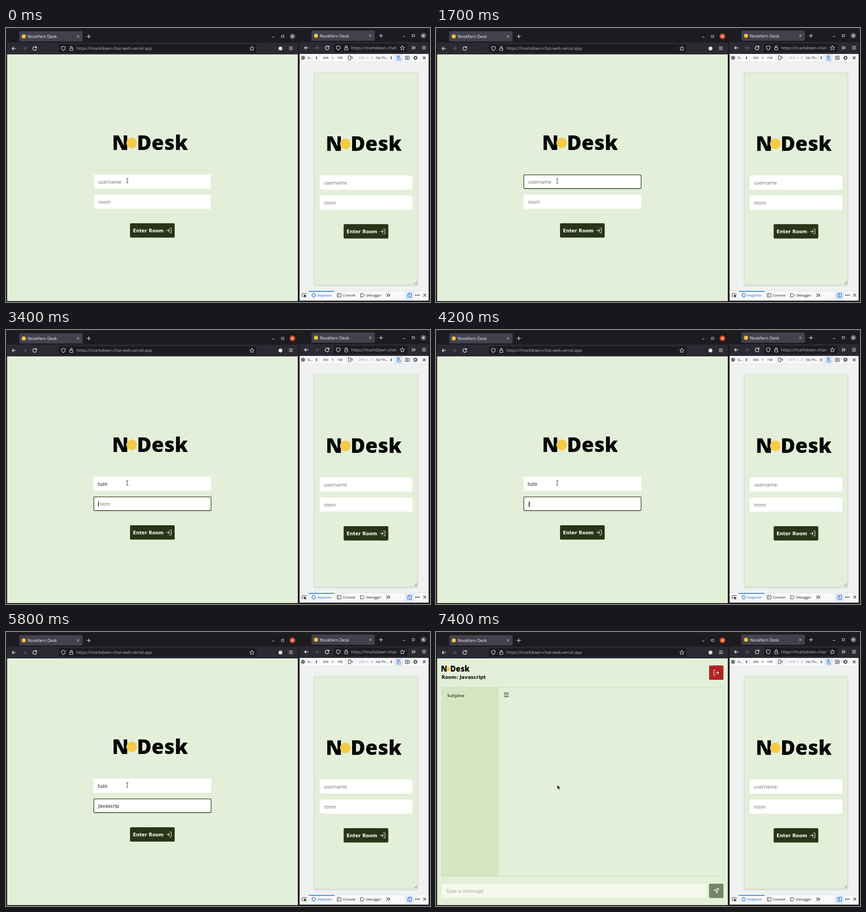
Recreate the animation shown at these times as an HTML page. Size 930x602 px, loop 8000 ms.

```html
<!DOCTYPE html>
<html lang="en">
<head>
<meta charset="utf-8">
<title>Nookfern Desk</title>
<style>
  html, body { margin: 0; width: 100%; height: 100%; overflow: hidden; background: #201f1d; }
  svg { display: block; width: 930px; height: 602px; }
  text { white-space: pre; }
  .ui { font: 9.2px "Open Sans", "Noto Sans", sans-serif; }
  .tool { font: 7.3px "Open Sans", "Noto Sans", sans-serif; fill: #18181a; }
  .web { font: 10.2px "DejaVu Sans", sans-serif; }
  .bold { font-weight: bold; }
  .hint { fill: #757871; }
  .logo { font: 800 44px "Open Sans", "Noto Sans", sans-serif; fill: #050402; }
  .line { fill: none; stroke-linecap: round; stroke-linejoin: round; }
  .field { fill: #fffffd; }
</style>
</head>
<body>
<svg viewBox="0 0 930 602">
  <defs>
    <g id="tab">
      <rect x="29" y="7" width="139" height="22.5" rx="2.5" fill="#42414d"/>
      <circle cx="39" cy="18.5" r="4.5" fill="#f3c43c"/>
      <text class="ui" x="47.5" y="22" fill="#fbfbfe">Nookfern Desk</text>
      <path class="line" d="M155.7 16.2l4.6 4.6m0-4.6l-4.6 4.6" stroke="#e4e4e8" stroke-width=".9"/>
      <path class="line" d="M177.5 18.5h8m-4-4v8" stroke="#fbfbfe" stroke-width="1.1"/>
    </g>
    <g id="controls" class="line" stroke="#e6e6e8">
      <path d="M584 20h4" stroke-width="1.1"/>
      <rect x="604.7" y="16" width="4.6" height="4.6"/>
    </g>
    <path id="cross" class="line" d="M-2.2-2.2l4.4 4.4m0-4.4l-4.4 4.4" stroke-width="1.1"/>
    <g id="nav" class="line" stroke-width="1.2">
      <path d="M21.5 45h-8m3.4-3.4L13.5 45l3.4 3.4" stroke="#fbfbfe"/>
      <path d="M36.5 45h8m-3.4-3.4l3.4 3.4-3.4 3.4" stroke="#65646e"/>
      <path d="M66.3 42.5a4.1 4.1 0 1 0 .8 3M67 40.6v2.6h-2.6" stroke="#fbfbfe"/>
    </g>
    <g id="guard" class="line" stroke="#e6e6ea" stroke-width="1.1">
      <path d="M125.8 40.3l4.3 1.5c.1 3.7-1.3 6.3-4.3 8-3-1.7-4.4-4.3-4.3-8z"/>
      <rect x="139.8" y="44.5" width="6.8" height="5" rx="1"/>
      <path d="M141.2 44.4v-2a2 2 0 0 1 4 0v2"/>
    </g>
    <path id="star" class="line" d="M0-4.8l1.4 3.1 3.5.4-2.6 2.3.8 3.4L0 2.7l-3.1 1.7.8-3.4-2.6-2.3 3.5-.4z" stroke="#e6e6ea"/>
    <path id="menu" class="line" d="M-3.7-3h7.4M-3.7 0h7.4M-3.7 3h7.4" stroke-width="1.1"/>
    <path id="more" class="line" d="M-3.5-3l3 3-3 3m4-6l3 3-3 3" stroke-width="1.1"/>
    <path id="updown" d="M-1.8-.8L0-3 1.8-.8zM-1.8.8L0 3 1.8.8z"/>
    <g id="logo">
      <text class="logo" x="232.5" y="268">N</text>
      <circle cx="275.5" cy="252.5" r="11.5" fill="#f7c948"/>
      <text class="logo" x="287" y="268">Desk</text>
    </g>
    <g id="enter">
      <rect x="272" y="429" width="98" height="31.5" rx="2.5" fill="#283516"/>
      <text class="web bold" x="278.5" y="448.5" fill="#fbfdf8">Enter Room</text>
      <path class="line" transform="translate(349.9 437.7) scale(.61)" stroke="#f4f7ef" stroke-width="1.8"
        d="M15 3h4a2 2 0 0 1 2 2v14a2 2 0 0 1-2 2h-4M10 17l5-5-5-5m5 5H3"/>
    </g>
    <filter id="soft" x="-10%" y="-10%" width="120%" height="120%">
      <feDropShadow dx="0" dy="1" stdDeviation="1.5" flood-color="#000" flood-opacity=".2"/>
    </filter>
    <clipPath id="url"><rect x="720" y="34" width="138" height="20"/></clipPath>
  </defs>

  <!-- wide window -->
  <path d="M2.5 600V9a6 6 0 0 1 6-6H634a6 6 0 0 1 6 6v591z" fill="#1c1b22"/>
  <rect x="2.5" y="32" width="637.5" height="26" fill="#2b2a33"/>
  <rect x="116" y="35.5" width="433.5" height="18.8" rx="2.5" fill="#1c1b22"/>
  <rect x="2.5" y="58" width="637.5" height="542" fill="#e3efd8"/>
  <use href="#tab"/>
  <use href="#controls"/>
  <circle id="close" cx="628.3" cy="18.3" r="6.2"/>
  <use href="#cross" x="628.3" y="18.3" stroke="#fff"/>
  <use href="#nav"/>
  <use href="#guard"/>
  <text class="ui" x="154.5" y="48.3" fill="#b9b8c0">https://markdown-chat-web.vercel.app</text>
  <use href="#star" x="539.3" y="45"/>
  <circle cx="602" cy="45" r="4.3" fill="#e6e6ea"/>
  <use href="#menu" x="624.8" y="44.5" stroke="#fbfbfe"/>

  <g id="login">
    <use href="#logo"/>
    <g id="user"><rect class="field" y="322" height="31.4" rx="2.5"/><text class="web" y="341.7"></text></g>
    <g id="room"><rect class="field" y="366" height="31.4" rx="2.5"/><text class="web" y="385.7"></text></g>
    <rect id="caret" width="1" height="12" fill="#111"/>
    <use href="#enter"/>
    <path id="beam" class="line" d="M264 330.5q2 0 2 1.2 0-1.2 2-1.2M266 331.5v8M264 340.7q2 0 2-1.2 0 1.2 2 1.2" stroke="#4b4d48" stroke-width="1.1"/>
  </g>

  <g id="chat">
    <use href="#logo" transform="translate(-77.7 -15.3) scale(.38)"/>
    <text class="web bold" x="12" y="103.2" fill="#0d0f0a">Room: Javascript</text>
    <rect x="599" y="73.5" width="31.5" height="31.5" rx="2.5" fill="#b02425"/>
    <path class="line" transform="translate(607.4 82.2) scale(.61)" stroke="#fff" stroke-width="1.8"
      d="M9 21H5a2 2 0 0 1-2-2V5a2 2 0 0 1 2-2h4M16 17l5-5-5-5m5 5H9"/>
    <rect x="12" y="122" width="126" height="414.5" fill="#d4e6c2"/>
    <rect x="12.3" y="121.8" width="618" height="415" rx="2" fill="none" stroke="#c9d8b8" stroke-width=".9"/>
    <text class="web bold" x="25" y="143" fill="#555f4b" style="font-size:8.9px">katpine</text>
    <path class="line" d="M149.5 134.2h9.6m-9.6 3.8h9.6m-9.6 3.8h9.6" stroke="#151713" stroke-width="1.2"/>
    <rect x="12" y="553" width="581" height="31.5" rx="2.5" fill="#f5f9ec"/>
    <text class="web" x="22" y="572.6" fill="#a2a79c">Type a message</text>
    <rect x="599" y="553" width="31.5" height="31.5" rx="2.5" fill="#748466"/>
    <path class="line" d="M620 563.3l-10.5 4 4.7 2 2 4.7zl-5.8 6" stroke="#fff" stroke-width="1.1"/>
    <path d="M266 335.5v10.2l2.3-2.1 1.6 3.6 1.7-.8-1.6-3.4h3.1z" fill="#111" stroke="#f4f8ef" stroke-width=".7"/>
  </g>

  <!-- narrow window -->
  <path d="M644 599V9a6 6 0 0 1 6-6h271a6 6 0 0 1 6 6v590z" fill="#1c1b22"/>
  <rect x="644" y="31" width="283" height="26" fill="#2b2a33"/>
  <rect x="719.5" y="34.5" width="161" height="18.5" rx="2.5" fill="#1c1b22"/>
  <use href="#tab" x="641" y="-1.5"/>
  <use href="#controls" x="286.7" y="-1.5"/>
  <circle cx="915.5" cy="16.8" r="6.2" fill="#5b5956"/>
  <use href="#cross" x="915.5" y="16.8" stroke="#fff"/>
  <use href="#nav" x="641.3" y="-1.3"/>
  <use href="#guard" x="603" y="-1.3"/>
  <text class="ui" x="757" y="47" fill="#b9b8c0" clip-path="url(#url)">https://markdown-chat-web</text>
  <use href="#star" x="869.5" y="43.7"/>
  <use href="#more" x="894" y="43.5" stroke="#fbfbfe"/>
  <use href="#menu" x="916.7" y="43.2" stroke="#fbfbfe"/>

  <!-- device toolbar -->
  <rect x="644" y="57" width="283" height="542" fill="#eff2f1"/>
  <rect x="644" y="57" width="283" height="18" fill="#f6f7f8"/>
  <path d="M644 75h283" stroke="#dddfe1" stroke-width=".8"/>
  <path d="M686.5 58v15M747 58v15M766 58v15M808.5 58v15M850.5 58v15" stroke="#e1e2e5" stroke-width=".8"/>
  <path d="M690 58.5h22v14h-22zM721 58.5h23v14h-23z" fill="#fff"/>
  <circle cx="651.5" cy="65.5" r="4.6" fill="#77787a"/>
  <g class="tool">
    <text x="661.5" y="68.2">G...</text>
    <text x="694.8" y="68.2">360</text>
    <text x="714.3" y="68.2">×</text>
    <text x="726" y="68.2">740</text>
    <text x="773" y="68.2" fill="#a5a6a9">DPR: 4</text>
    <text x="811.8" y="68.2">No Th...</text>
  </g>
  <use href="#updown" x="681" y="65.5"/>
  <use href="#updown" x="802.5" y="65.5" fill="#a5a6a9"/>
  <use href="#updown" x="845" y="65.5"/>
  <rect x="852.5" y="57.5" width="18" height="16.5" fill="#dde7f4"/>
  <g class="line" stroke="#222326">
    <rect x="751" y="61.2" width="5.5" height="8.6" rx="1"/>
    <path d="M758 63.3h1.5v3.5m-1.2-1.2l1.2 1.2 1.2-1.2" stroke-width=".8"/>
    <rect x="875.7" y="62" width="9" height="7.3" rx="1.2"/>
    <circle cx="880.2" cy="65.7" r="1.7"/>
    <circle cx="898" cy="65.5" r="2.8" stroke-width="1.4"/>
    <circle cx="898" cy="65.5" r="4.1" stroke-width="1.6" stroke-dasharray="1 2.22" stroke-linecap="butt"/>
  </g>
  <path class="line" d="M859.5 68v-5a1 1 0 0 1 2 0v3l2.8.6c.8.2 1 .7.8 1.4l-.6 2.7h-4.3l-2.6-3.2q.6-.9 1.9.5M857.8 64a2.8 2.8 0 1 1 5.4 0" stroke="#1565d8" stroke-width=".9"/>
  <use href="#cross" transform="translate(917.3 65.5) scale(1.2)" stroke="#222326"/>

  <!-- device screen -->
  <rect x="676.3" y="97.7" width="226.7" height="467" fill="#e3efd8" filter="url(#soft)"/>
  <rect x="676.3" y="97.7" width="226.7" height="467" fill="none" stroke="#cdd6c7" stroke-width=".7"/>
  <path d="M895 563l7-7m-4.5 7l4.5-4.5m-2 4.5l2-2" stroke="#7c8376" stroke-width=".9"/>
  <use href="#logo" x="468.7" y="2"/>
  <rect class="field" x="687.7" y="324" width="203.8" height="31.3" rx="2.5"/>
  <rect class="field" x="687.7" y="368" width="203.8" height="31.3" rx="2.5"/>
  <text class="web hint" x="697" y="343.7">username</text>
  <text class="web hint" x="697" y="387.7">room</text>
  <use href="#enter" x="468.6" y="2"/>

  <!-- devtools bar -->
  <rect x="644" y="577.7" width="283" height="21.3" fill="#f8f9fa"/>
  <path d="M644 577.5h283" stroke="#dddfe1" stroke-width=".8"/>
  <path d="M664 578.7h56.5" stroke="#0a6de0" stroke-width="1.5"/>
  <rect x="876" y="579" width="18" height="19" fill="#dde7f4"/>
  <path d="M664 580v17M873.5 580v17" stroke="#e1e2e5" stroke-width=".8"/>
  <g class="tool">
    <text x="683" y="590" fill="#0560d8">Inspector</text>
    <text x="739" y="590">Console</text>
    <text x="790" y="590">Debugger</text>
  </g>
  <g class="line" stroke="#222326">
    <path d="M652 590.3h-1.5a1 1 0 0 1-1-1v-5a1 1 0 0 1 1-1h7a1 1 0 0 1 1 1v1.5"/>
    <path d="M653.5 586l5 2-2 1 2 2.3-1 .8-2-2.3-1 1.7z" fill="#222326" stroke-width=".5"/>
    <rect x="726.5" y="583.3" width="8.5" height="7.8" rx="1.2"/>
    <path d="M728.7 585.3l2 1.9-2 1.9M778 583.7h5l3.3 3.5-3.3 3.5h-5z"/>
  </g>
  <g class="line" stroke="#0a63da">
    <rect x="671.7" y="584" width="6.6" height="6.6" rx="1"/>
    <path d="M675 582.5v1m0 7.5v1m-4.8-4.7h1m7.6 0h1"/>
    <path d="M883 584.7v-1.9h6.5v8.7h-4"/>
    <rect x="881" y="585" width="4.3" height="6.7" rx=".8"/>
  </g>
  <use href="#more" x="838.5" y="587" stroke="#222326"/>
  <g fill="#222326"><circle cx="898.6" cy="587" r="1.2"/><circle cx="902.3" cy="587" r="1.2"/><circle cx="906" cy="587" r="1.2"/></g>
  <use href="#cross" transform="translate(918.5 587) scale(1.2)" stroke="#222326"/>
</svg>

<script>
const LOOP = 8000, ENTER = 7400;
// time, focused field, user, room, caret visible
const steps = [
  [0, '', '', '', 0],
  [500, 'user', '', '', 1],
  [1700, 'user', '', '', 0],
  [2500, 'user', 'l', '', 1],
  [2600, 'user', 'luz', '', 1],
  [2700, 'user', 'luzo', '', 1],
  [2900, 'user', 'luzo', '', 0],
  [3400, 'room', 'luzo', '', 1],
  [4200, 'room', 'luzo', 'J', 1],
  [4500, 'room', 'luzo', 'Ja', 1],
  [4600, 'room', 'luzo', 'Jav', 1],
  [4900, 'room', 'luzo', 'Javas', 1],
  [5100, 'room', 'luzo', 'Javasc', 1],
  [5400, 'room', 'luzo', 'Javascr', 1],
  [5500, 'room', 'luzo', 'Javascri', 1],
  [5600, 'room', 'luzo', 'Javascrip', 1],
  [5800, 'room', 'luzo', 'Javascrip', 0],
  [6500, 'room', 'luzo', 'Javascript', 1],
  [7000, 'room', 'luzo', 'Javascript', 0],
];

const $ = id => document.getElementById(id);
const set = (el, attrs) => Object.entries(attrs).forEach(([k, v]) => el.setAttribute(k, v));
const show = (el, on) => el.style.display = on ? '' : 'none';

function drawField(id, value, hint, focus) {
  const [box, label] = $(id).children;
  const on = focus === id;
  const inset = on ? 0.65 : 0;
  const left = focus ? 191.9 : 193.2;
  const top = id === 'user' ? 322 : 366;
  set(box, {
    x: left + inset, y: top + inset,
    width: (focus ? 258.6 : 256) - 2 * inset, height: 31.4 - 2 * inset,
    stroke: on ? '#283516' : 'none', 'stroke-width': 1.3,
  });
  label.textContent = value || hint;
  set(label, { x: left + (on ? 10.4 : 9.2), fill: value ? '#10120d' : '#757871' });
  if (on) {
    const width = value ? label.getComputedTextLength() : 0;
    set($('caret'), { x: Math.round(left + 10.4 + width), y: top + 10 });
  }
}

function render(t) {
  const inChat = t >= ENTER;
  const [, focus, user, room, caret] = steps.findLast(s => s[0] <= t);
  show($('login'), !inChat);
  show($('chat'), inChat);
  set($('close'), { fill: focus ? '#dd421b' : '#5b5956' });
  if (inChat) return;
  drawField('user', user, 'username', focus);
  drawField('room', room, 'room', focus);
  show($('caret'), caret);
  set($('beam'), { transform: `translate(0 ${t < 900 ? -0.3 : 0.6})` });
}

const start = performance.now();
function tick() {
  render((performance.now() - start) % LOOP);
  requestAnimationFrame(tick);
}
tick();
</script>
</body>
</html>
```
